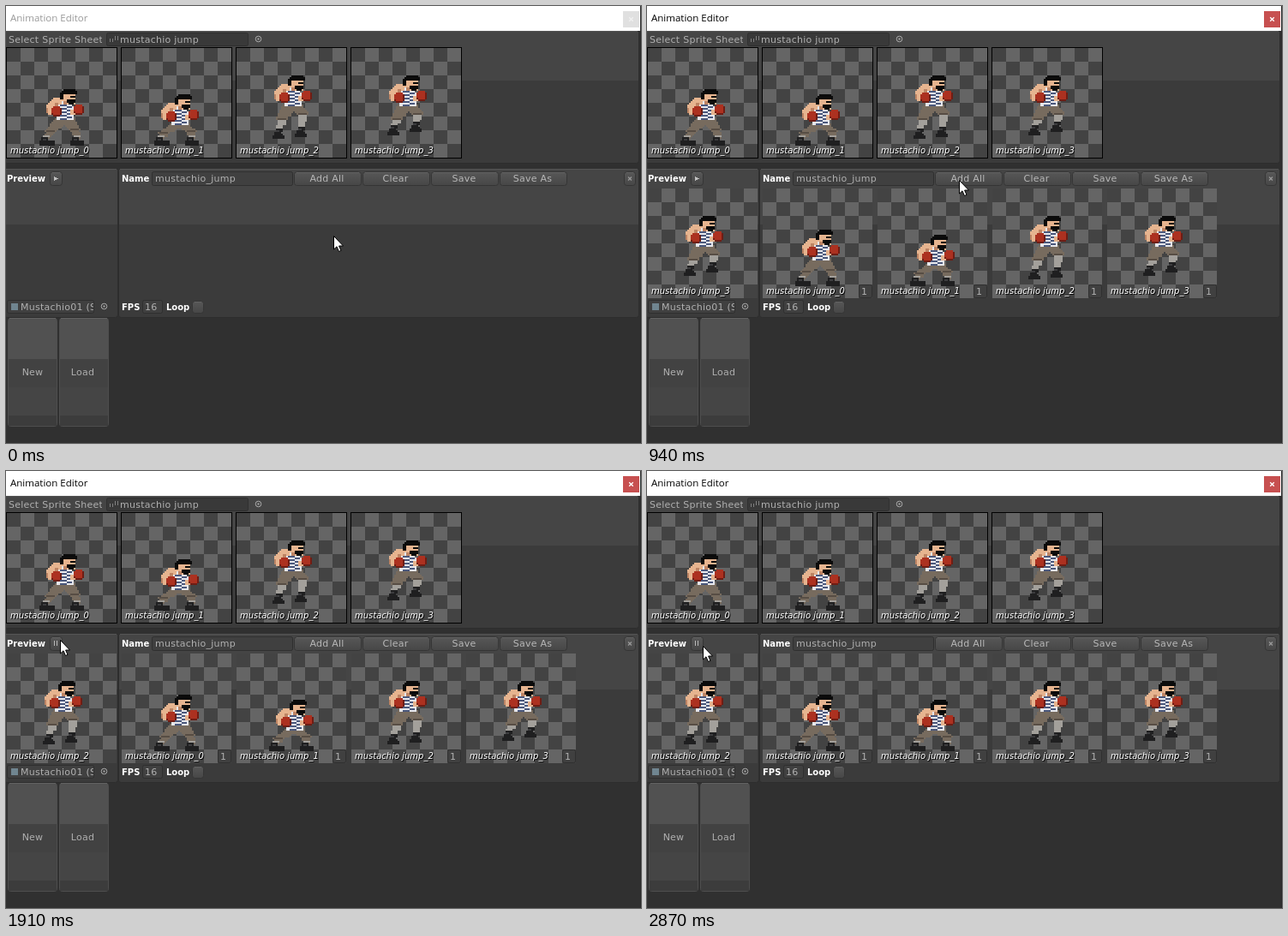
These frames come from a looping animation (741 px wide and 510 px high, 2.97 s). An HTML page with a canvas:

```html
<!DOCTYPE html>
<html lang="en">
<head>
<meta charset="utf-8">
<title>Animation Editor</title>
<style>
html, body { margin: 0; width: 741px; height: 510px; overflow: hidden; background: #303030; }
canvas { display: block; }
</style>
</head>
<body>
<canvas id="stage" width="741" height="510"></canvas>
<script>
const ctx = document.getElementById('stage').getContext('2d');
const LOOP = 2970, start = performance.now();
const SANS = '"DejaVu Sans", sans-serif';
const REGULAR = '11px ' + SANS, BOLD = 'bold 10px ' + SANS, ITALIC = 'italic 10px ' + SANS;

function box(color, x, y, w, h) {
  ctx.fillStyle = color;
  ctx.fillRect(x, y, w, h);
}

function text(s, x, y, color = '#b0b0b0', font = REGULAR, align = 'left') {
  ctx.font = font;
  ctx.letterSpacing = font === REGULAR ? '0.25px' : '0px';
  ctx.textAlign = align;
  ctx.fillStyle = color;
  ctx.fillText(s, x, y);
}

function clipped(s, x, y, right) {
  ctx.save();
  ctx.beginPath();
  ctx.rect(x, y - 14, right - x, 20);
  ctx.clip();
  text(s, x, y);
  ctx.restore();
}

function rounded(fill, edge, x, y, w, h, r = 2) {
  ctx.beginPath();
  ctx.roundRect(x + .5, y + .5, w - 1, h - 1, r);
  ctx.fillStyle = fill;
  ctx.fill();
  ctx.strokeStyle = edge;
  ctx.lineWidth = 1;
  ctx.stroke();
}

function button(x, y, w, h, label = '', lit = false) {
  const g = ctx.createLinearGradient(0, y, 0, y + h);
  g.addColorStop(0, lit ? '#686868' : '#585858');
  g.addColorStop(1, lit ? '#555555' : '#464646');
  rounded(g, '#353535', x, y, w, h, 3);
  box('#636363', x + 3, y + 1, w - 6, 1);
  text(label, x + w / 2 - 1, y + 12, '#b8b8b8', REGULAR, 'center');
}

const field = (x, y, w, h, fill = '#404040') => rounded(fill, '#2f2f2f', x, y, w, h);

function panel(x, y, w, h, split) {
  rounded('#3b3b3b', '#2d2d2d', x, y, w, h, 3);
  box('#454545', x + 1, y + 1, w - 2, split - y - 1);
  box('#555555', x + 2, y, w - 4, 1);
}

function bigButton(x, label, center) {
  rounded('#454545', '#4e4e4e', x, 364, 58, 127, 3);
  box('#515151', x + 1, 365, 56, 47);
  box('#424242', x + 1, 412, 56, 33);
  box('#3c3c3c', x + 1, 478, 56, 12);
  box('#626262', x + 2, 364, 54, 1);
  text(label, center, 431, '#b0b0b0', REGULAR, 'center');
}

function picker(x, y) {
  ctx.beginPath();
  ctx.arc(x, y, 3.3, 0, 7);
  ctx.strokeStyle = '#aaaaaa';
  ctx.lineWidth = 1;
  ctx.stroke();
  box('#aaaaaa', x - 1, y - 1, 2, 2);
}

function cross(x, y, r, color) {
  ctx.beginPath();
  ctx.moveTo(x - r, y - r); ctx.lineTo(x + r, y + r);
  ctx.moveTo(x + r, y - r); ctx.lineTo(x - r, y + r);
  ctx.strokeStyle = color;
  ctx.lineWidth = 1.3;
  ctx.stroke();
}

// Sprite, in cells of two stage pixels
const SKIN = '#e6b48f', SHADE = '#bd8464', INK = '#0b0b0b', RED = '#ac3120',
      MAROON = '#6f1d14', PANTS = '#776b5e', FOLD = '#574d44', SOCK = '#a3a09b', BOOT = '#1f1f20',
      STRIPE = '#4b587c';

function limb(color, x0, y0, x1, y1, w0, w1) {
  for (let y = y0; y <= y1; y++) {
    const k = (y - y0) / Math.max(1, y1 - y0);
    box(color, Math.round(x0 + (x1 - x0) * k), y, Math.round(w0 + (w1 - w0) * k), 1);
  }
}

function leg(hipX, hipY, kneeX, kneeY, ankleX, ankleY, air, toe) {
  limb(PANTS, hipX, hipY, kneeX, kneeY, 9, 7);
  box(FOLD, kneeX + 1, kneeY, 5, 1);
  limb(air ? SOCK : PANTS, kneeX + 1, kneeY + 1, ankleX + 1, ankleY, 5, 4);
  if (air) {
    limb(BOOT, ankleX + 1, ankleY, ankleX - 1, ankleY + 5, 4, 5);
    box(BOOT, ankleX + 3, ankleY + 4, 3, 2);
  } else {
    box(SOCK, ankleX + 1, ankleY - 1, 4, 1);
    box(BOOT, ankleX, ankleY, 4, 5);
    box(BOOT, ankleX - 1, ankleY + 2, toe, 3);
  }
  box('#3c3c3e', ankleX + 1, ankleY + 1, 2, 1);
}

function glove(x, y) {
  box(RED, x + 1, y, 4, 6);
  box(RED, x, y + 1, 6, 4);
  box(MAROON, x, y + 4, 1, 1);
  box(MAROON, x + 1, y + 5, 4, 1);
  box(MAROON, x + 5, y + 1, 1, 4);
}

function torso() {
  // shirt: white with slanting dashes
  limb('#e6e7ec', 30, 31, 29, 41, 8, 10);
  for (let y = 32; y < 42; y += 2) {
    box(STRIPE, 31, y + 1, 4, 1);
    box(STRIPE, 35, y, 3, 1);
  }
  // back arm
  limb(SKIN, 27, 29, 24, 32, 6, 8);
  limb(SKIN, 23, 33, 23, 36, 6, 5);
  box(SKIN, 24, 37, 4, 2);
  box(SHADE, 23, 35, 1, 3);
  box(SHADE, 28, 32, 2, 2);
  // head
  box(SKIN, 33, 27, 7, 6);
  box(SHADE, 33, 31, 2, 2);
  box(INK, 33, 24, 7, 1);
  box(INK, 32, 25, 9, 2);
  box(INK, 31, 26, 2, 4);
  box(INK, 37, 28, 3, 1);
  box(INK, 35, 30, 5, 2);
  box(INK, 36, 32, 3, 1);
  // front forearm and gloves
  box(SKIN, 37, 36, 4, 3);
  glove(26, 34);
  glove(39, 33);
}

const POSES = [
  { dx: 0, dy: 0, left: [22, 48, 20, 52], right: [36, 47, 38, 52] },
  { dx: 0, dy: 3, left: [21, 49, 20, 52], right: [37, 48, 38, 52] },
  { dx: -1, dy: -8, left: [23, 41, 22, 47], right: [35, 38, 35, 46], air: true },
  { dx: -1, dy: -8, left: [23, 41, 22, 45], right: [35, 38, 35, 43], air: true }
];

function tile(x, y, pose) {
  for (let i = 0; i < 64; i++) {
    const col = i % 8, row = i >> 3;
    box((col + row) % 2 ? '#656565' : '#434343', x + col * 16, y + row * 16, 16, 16);
  }
  const { dx, dy, left, right, air } = POSES[pose];
  ctx.save();
  ctx.translate(x, y);
  ctx.scale(2, 2);
  leg(27 + dx, 42 + dy, ...left, air, 9);
  leg(31 + dx, 42 + dy, ...right, air, 8);
  ctx.translate(dx, dy);
  box(PANTS, 28, 41, 12, 3);
  torso();
  ctx.restore();
  const name = 'mustachio jump_' + pose;
  text(name, x + 5, y + 124, '#000', ITALIC);
  text(name, x + 4, y + 123, '#fff', ITALIC);
}

// Pointer
function pointer(x, y) {
  ctx.save();
  ctx.translate(x, y);
  ctx.beginPath();
  ctx.moveTo(.5, .5);
  for (const [px, py] of [[.5, 16], [4, 12.8], [6.5, 18.5], [9, 17.4], [6.6, 12], [11.5, 12]]) ctx.lineTo(px, py);
  ctx.closePath();
  ctx.fillStyle = '#fff';
  ctx.fill();
  ctx.strokeStyle = '#000';
  ctx.lineWidth = 1;
  ctx.stroke();
  ctx.restore();
}

function ring(x, y) {
  ctx.beginPath();
  ctx.arc(x, y, 9, 0, 7);
  ctx.strokeStyle = '#222';
  ctx.lineWidth = 3;
  ctx.stroke();
  ctx.strokeStyle = '#d8d8d8';
  ctx.lineWidth = 1.4;
  ctx.stroke();
}

// Each move: start, end, steps, target; the pointer hops in eased steps.
const MOVES = [
  [310, 710, 8, 364, 203],
  [1000, 1350, 7, 66, 202],
  [1400, 1400, 1, 64, 200],
  [1430, 1430, 1, 62, 197],
  [1670, 1670, 1, 63, 197],
  [2310, 2310, 1, 74, 198],
  [2370, 2430, 2, 65, 203],
  [2640, 2640, 1, 65, 204]
];

function pointerAt(t) {
  let x = 382, y = 268;
  for (const [from, to, steps, tx, ty] of MOVES) {
    if (t < from) break;
    const gap = (to - from) / Math.max(1, steps - 1) || 1;
    const p = Math.min(1, (Math.floor((t - from) / gap) + 1) / steps);
    const e = p * p * (3 - 2 * p);
    x += (tx - x) * e;
    y += (ty - y) * e;
  }
  return [Math.round(x), Math.round(y)];
}

// Preview: four poses at about 16 per second, then stop
function previewAt(t) {
  const age = t - (t >= 2750 ? 2750 : 1790);
  const playing = age >= 0 && age < 240;
  return { playing, pose: playing ? Math.floor(age / 60) : 3 };
}

const within = (t, a, b) => t >= a && t < b;

function draw(t) {
  const active = t >= 850, filled = t >= 940;
  const { playing, pose } = previewAt(t);

  box('#303030', 0, 0, 741, 510);

  // sprite sheet
  panel(-2, 29, 741, 155, 87);
  clipped('Select Sprite Sheet', 3, 43, 112);
  field(117, 31, 166, 16, '#393939');
  for (let i = 0; i < 4; i++) box('#808080', 121 + i * 3, i < 2 ? 38 : 35, 1, i < 2 ? 4 : 5);
  text('mustachio jump', 133, 43);
  picker(294.5, 38.5);
  for (let i = 0; i < 4; i++) {
    box('#000', i * 134, 48, 130, 130);
    tile(i * 134 + 1, 49, i);
  }

  // title bar
  box('#fff', 0, 0, 741, 29);
  text('Animation Editor', 5, 18, active ? '#000' : '#999', '11.5px "Open Sans", sans-serif');
  box(active ? '#c75050' : '#e0e0e0', 720, 6, 19, 19);
  cross(729.5, 15.5, 2.3, active ? '#fff' : '#f0f0f0');

  // preview
  panel(-2, 190, 133, 174, 255);
  text('Preview', 1, 205, '#fff', BOLD);
  button(51, 193, 15, 17);
  if (playing) {
    box('#b8b8b8', 56, 198, 1, 6);
    box('#b8b8b8', 59, 198, 1, 6);
  } else {
    limb('#c0c0c0', 56, 199, 56, 201, 1, 5);
    limb('#c0c0c0', 56, 202, 56, 203, 3, 1);
  }
  field(1, 343, 102, 16);
  box('#708590', 6, 347, 8, 8);
  clipped('Mustachio01 (Sprite)', 17, 355, 102);
  picker(114.5, 350.5);

  // clip editor
  panel(131, 190, 608, 174, 255);
  text('Name', 135, 205, '#fff', BOLD);
  field(170, 193, 165, 17);
  text('mustachio_jump', 174, 205);
  ['Add All', 'Clear', 'Save', 'Save As'].forEach((label, i) =>
    button(336 + i * 80, 193, 79, 17, label, i === 0 && within(t, 850, 940)));
  button(721, 193, 14, 17);
  cross(728, 201.5, 2, '#999');
  text('FPS', 135, 355, '#fff', BOLD);
  field(159, 343, 24, 16);
  text('16', 162, 355);
  text('Loop', 187, 355, '#fff', BOLD);
  button(217, 344, 14, 15);

  if (filled) {
    tile(1, 213, pose);
    for (let i = 0; i < 4; i++) {
      const x = 135 + i * 134;
      tile(x, 213, i);
      field(x + 112, 325, 16, 16);
      text('1', x + 115, 337);
    }
  }

  bigButton(2, 'New', 31);
  bigButton(62, 'Load', 89.5);
  box('#292929', 740, 0, 1, 510);

  const [x, y] = pointerAt(t);
  if (within(t, 850, 940) || within(t, 1670, 1790) || within(t, 2640, 2750)) ring(x + 1, y + 1);
  pointer(x, y);
}

function tick() {
  draw((performance.now() - start) % LOOP);
  requestAnimationFrame(tick);
}
tick();
</script>
</body>
</html>
```
